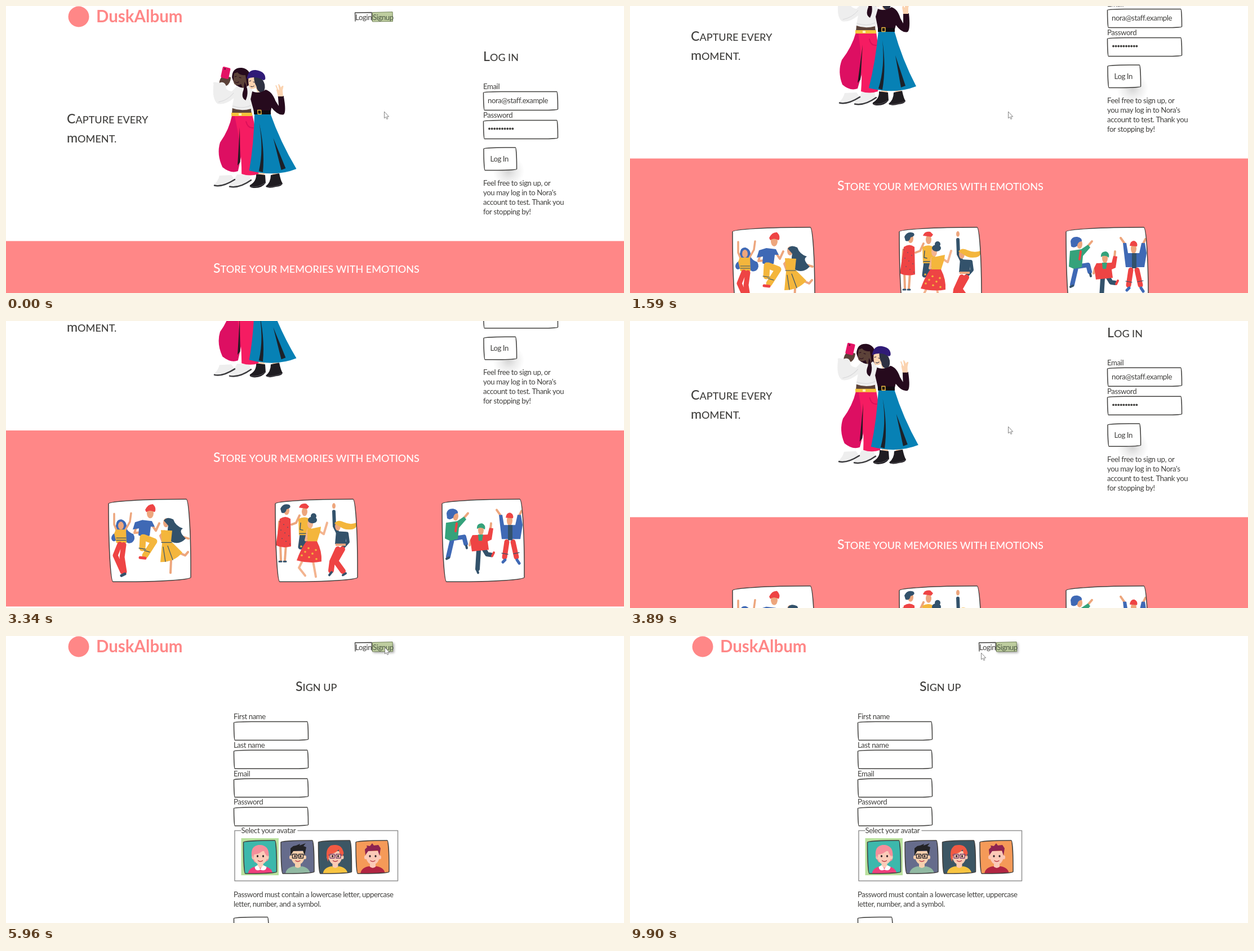
Recreate the animation shown at these times as an HTML page with a canvas. Size 1097 by 511 pixels, loop 9.98 s.

```html
<!DOCTYPE html>
<html lang="en">
<head>
<meta charset="utf-8">
<title>DuskAlbum</title>
<style>
html, body { margin: 0; width: 100%; height: 100%; overflow: hidden; background: #fff; }
canvas { display: block; }
</style>
</head>
<body>
<canvas id="stage" width="1097" height="511"></canvas>
<script>
const ctx = document.getElementById('stage').getContext('2d');
const LOOP = 9980;
const INK = '#41403e', PINK = '#ff8787', NAVY = '#33526b', RED = '#ee4444',
  YELLOW = '#f4b63c', BLUE = '#3f69b5', GREEN = '#35a27b', SKIN = '#eda67d';

// Keys are [time, value, ...], linear between neighbours.
const loginScroll = [[80, 0], [1020, 60], [1100, 60], [1590, 147], [1740, 147], [2060, 269],
  [2540, 330], [2710, 330], [3340, 224], [3660, 110], [3750, 110], [4130, 0]];
const signupScroll = [[6930, 0], [7330, 20.5], [8780, 20.5], [9200, 0]];
const swayKeys = [[0, 1], [400, .85], [1100, .15], [1590, 0], [1740, 0], [2060, .12], [2900, .8],
  [3340, 1], [3660, .8], [4130, .2], [4460, .2], [4940, 0], [5490, .1]];
const cursorKeys = [[4460, 671, 188], [4940, 665, 46], [5420, 672, 20], [6200, 672, 20],
  [6600, 559, 111], [6930, 559, 111], [7200, 545, 128], [7410, 545, 128], [7640, 531, 354],
  [7890, 531, 354], [8370, 488, 338], [8780, 488, 338], [9740, 611, 53], [9820, 615, 45], [9900, 623, 30]];

function at(keys, t) {
  const i = keys.findIndex(k => k[0] > t);
  if (i < 0) return keys[keys.length - 1].slice(1);
  if (i === 0) return keys[0].slice(1);
  const a = keys[i - 1], b = keys[i], u = (t - a[0]) / (b[0] - a[0]);
  return a.slice(1).map((v, j) => v + (b[j + 1] - v) * u);
}

// Text
function setFont(size, weight, tracking = 0) {
  ctx.font = `${weight} ${size}px Lato, sans-serif`;
  ctx.letterSpacing = `${tracking * size}px`;
}
function plain(s, size, x, y) {
  setFont(size, 400, -.03);
  ctx.fillText(s, x, y);
  return ctx.measureText(s).width;
}
function smallCaps(s, size, x, y) {
  let width = 0;
  for (const [part, scale] of [[s[0], 1], [s.slice(1).toUpperCase(), .78]]) {
    setFont(size * scale, 500);
    ctx.fillText(part, x + width, y);
    width += ctx.measureText(part).width;
  }
  return width;
}
const sizeFor = (style, sample, width) => 100 * width / style(sample, 100, 0, -500);
const bodySize = sizeFor(plain, 'Password must contain a lowercase letter, uppercase', 284);
const headSize = sizeFor(smallCaps, 'Store your memories with emotions', 366);

function text(s, x, y, color = INK) {
  ctx.fillStyle = color;
  plain(s, bodySize, x, y);
}
function heading(s, x, y, color = INK) {
  ctx.fillStyle = color;
  smallCaps(s, headSize, x, y);
}

// Shapes
function fill(color, d) {
  ctx.fillStyle = color;
  ctx.fill(new Path2D(d));
}
function line(color, width, d) {
  ctx.strokeStyle = color;
  ctx.lineWidth = width;
  ctx.lineCap = ctx.lineJoin = 'round';
  ctx.stroke(new Path2D(d));
}
function oval(color, x, y, rx, ry = rx) {
  ctx.fillStyle = color;
  ctx.beginPath();
  ctx.ellipse(x, y, rx, ry, 0, 0, 7);
  ctx.fill();
}
function rect(color, x, y, w, h) {
  ctx.fillStyle = color;
  ctx.fillRect(x, y, w, h);
}

// Hand-drawn box with long uneven corners
function paper(x, y, w, h) {
  const f = Math.min(w, h) / 270, a = 255 * f, b = 15 * f, c = 225 * f, q = Math.PI / 2;
  ctx.beginPath();
  ctx.ellipse(x + a, y + b, a, b, 0, 2 * q, 3 * q);
  ctx.ellipse(x + w - b, y + c, b, c, 0, -q, 0);
  ctx.ellipse(x + w - c, y + h - b, c, b, 0, 0, q);
  ctx.ellipse(x + b, y + h - a, b, a, 0, q, 2 * q);
  ctx.closePath();
}
function outline(...area) {
  paper(...area);
  ctx.strokeStyle = INK;
  ctx.lineWidth = 1.5;
  ctx.stroke();
}
function box(...area) {
  paper(...area);
  ctx.fillStyle = '#fff';
  ctx.fill();
  outline(...area);
}
function picture(x, y, w, h, bg, draw) {
  ctx.save();
  paper(x, y, w, h);
  ctx.clip();
  rect(bg, x, y, w, h);
  ctx.translate(x, y);
  draw();
  ctx.restore();
  outline(x, y, w, h);
}
function field(label, x, y, value = '') {
  text(label, x, y);
  box(x + .5, y + 4.5, 132, 33);
  text(value, x + 8, y + 25);
}
function button(label, x, y, w) {
  const cx = x + w - 14, cy = y + 42;
  const glow = ctx.createRadialGradient(cx, cy, 0, cx, cy, 28);
  glow.addColorStop(0, 'rgba(0,0,0,.17)');
  glow.addColorStop(.5, 'rgba(0,0,0,.07)');
  glow.addColorStop(1, 'rgba(0,0,0,0)');
  oval(glow, cx, cy, 28);
  box(x + .5, y + .5, w, 40.5);
  text(label, x + 12, y + 25.5);
}

function header(hover) {
  oval(PINK, 129, 19, 18.5);
  setFont(29.5, 700);
  ctx.fillStyle = PINK;
  ctx.fillText('DuskAlbum', 160, 28.5);
  line(INK, 1.3, 'M620 27L619.5 12L649 11.5L650 26');
  text('Login', 620, 25);
  ctx.save();
  if (hover) {
    ctx.shadowColor = 'rgba(0,0,0,.35)';
    ctx.shadowBlur = 4;
    ctx.shadowOffsetX = ctx.shadowOffsetY = 2;
  }
  rect('#becd9f', 650, 11, 36.5, 16.5);
  ctx.restore();
  line('#75865b', 1, 'M650.5 27.5L650.5 11.5L686 10.5L686.5 27Z');
  text('Signup', 651, 25, '#4d5a45');
}

// Two friends swaying: hips and hems lean opposite to the shoulders.
function lean(k, draw) {
  ctx.save();
  ctx.transform(1, 0, k, 1, -k * 190, 0);
  draw();
  ctx.restore();
}
function friends(s) {
  const dark = '#260a1d', brown = '#5c4239', white = '#eeeeee', pale = '#fbd3b0', shoe = '#1f1c21';
  ctx.save();
  ctx.translate(-2 * s, 0);
  fill(white, 'M381 302Q378 313 371 318Q374 322 386 321Q397 318 408 309L402 301Z');
  fill(white, 'M412 300Q407 311 398 318Q402 323 414 322Q427 317 436 309L434 300Z');
  line('#3a3a3d', 2.5, 'M372 319.5Q386 323 408 309M399 321.5Q416 325 437 310');
  ctx.restore();
  ctx.save();
  ctx.translate(2 * s, 0);
  fill(pale, 'M446 290H457V304H446ZM471 290H481V304H471Z');
  fill(shoe, 'M442 299L458 301L459 315Q452 325 437 324Q429 323 431 319Q443 312 442 299Z');
  fill(shoe, 'M468 301L483 298Q486 312 489 316Q488 321 477 322Q463 326 459 321Q468 314 468 301Z');
  line('#555258', 1, 'M432 321.5Q446 324 458 315M461 322.5Q477 322 488 317');
  ctx.restore();

  lean(.075 * s, () => {
    fill('#dd0f62', 'M401 194L425 196Q418 250 404 294Q391 299 377 287Q368 264 376 243Q394 220 401 194Z');
    fill('#f51c62', 'M405 194L437 194L445 248L440 299Q425 304 410 299Q414 250 405 194Z');
    fill('#221a21', 'M413 216Q408 255 404 284L409 278Z');
    line('#dc1059', 2, 'M425 206Q427 218 437 217');
  });
  lean(.03 * s, () => {
    fill(dark, 'M403 127Q404 109 421 110Q437 112 437 133Q440 151 428 168Q418 165 422 146Q407 145 403 127Z');
    fill(brown, 'M407 120Q404 134 407 139Q412 143 419 139L422 148L430 146L427 123Q417 124 413 118Z');
    line(dark, 1, 'M408 126L411 125M416 127L419 128M408 135Q411 138 415 135');
    fill(brown, 'M380 139Q380 129 388 124L401 127Q400 138 393 142Z');
    ctx.save();
    ctx.translate(392, 119);
    ctx.rotate(.24);
    ctx.fillStyle = '#e41365';
    ctx.beginPath();
    ctx.roundRect(-7, -10, 14, 20, 2);
    ctx.fill();
    ctx.restore();
    oval('#5c1334', 391, 112, 1.5);
    fill(white, 'M370 139Q367 133 380 137Q389 133 392 142Q390 150 402 152L412 142Q423 150 432 141L440 152L437 185Q417 190 401 184L405 164Q389 177 376 174Q366 166 370 139Z');
    line('#d7d7d9', 1, 'M378 171Q394 168 405 155M403 178Q420 184 435 177');
    fill(dark, 'M425 135Q434 152 426 168Q417 163 423 149Z');
    fill(brown, 'M402 182Q418 188 435 183L436 192H401Z');
    rect('#f4c23a', 400, 190, 37, 6);
    rect('#fff1bd', 413, 191, 5, 4);
  });

  lean(.075 * s, () => {
    fill('#0781b5', 'M441 191H469Q483 242 508 290Q470 305 424 293Q436 245 441 191Z');
    fill('#1c2129', 'M448 208Q453 255 441 294L448 296Q455 255 448 208ZM471 235L489 289L481 292Z');
    fill(pale, 'M435 127Q433 142 437 147Q442 149 447 145L449 154L457 150L452 127Z');
    fill('#2e3142', 'M445 124Q460 124 463 140Q464 152 456 154Q448 152 448 143Q444 136 445 124Z');
    line('#333146', 1, 'M436 134L439 133M443 135L445 136M438 143Q441 145 444 142');
    fill('#301b77', 'M432 130Q435 113 449 114Q465 116 465 128Q465 132 461 132Q447 123 432 130Z');
    fill(dark, 'M440 152Q452 157 464 149Q475 152 480 169L485 178L485 160H495Q498 188 493 193Q483 196 472 181L469 192H441L436 166Z');
    fill(pale, 'M485 161L483 149Q485 147 488 150L488 142Q490 139 491 145L494 142Q496 143 494 148L494 161Z');
    line(pale, 2, 'M486 151L483 142M489 149L488 140M493 150L495 143');
    rect('#100b11', 440, 186, 30, 7);
    ctx.strokeStyle = '#f0bc42';
    ctx.lineWidth = 1.4;
    ctx.strokeRect(447, 185.5, 6, 7);
  });
}

// Dancers, in card coordinates
function dancersA() {
  fill(BLUE, 'M13 47Q14 35 23 36Q33 39 32 52Q35 59 44 62Q49 71 42 77Q34 81 30 74L14 73Q7 78 5 70Q5 63 12 60Z');
  line(SKIN, 3.5, 'M15 57L10 45L10 26M29 56L38 40L40 25');
  oval(SKIN, 22, 47, 5, 7);
  fill(YELLOW, 'M13 54L31 54L32 78H14L10 61Z');
  line(NAVY, 1.2, 'M14 69H31M14 73H31');
  line(RED, 9, 'M20 80L12 100L25 129M27 81L24 103L28 129');
  line(NAVY, 5, 'M23 136L29 133');
  line(SKIN, 4, 'M50 47L46 60L58 59M78 47L84 56L90 43');
  fill(BLUE, 'M47 41L60 37L77 39L82 49L75 49L73 65Q62 70 53 64L54 52L43 54Z');
  oval(SKIN, 74, 25, 6, 9);
  fill(RED, 'M65 19Q70 8 79 9Q86 16 82 23Q73 18 67 23Z');
  line(YELLOW, 11, 'M63 68L81 75L65 100M61 68L60 87');
  line(NAVY, 1.2, 'M54 87L66 89M63 91L73 94');
  line(RED, 5, 'M56 104L65 105');
  line(SKIN, 4, 'M99 57L92 65L96 76M113 59L125 65L142 70M111 108L110 131M118 92L136 100L141 94');
  oval(SKIN, 102, 42, 5, 8);
  fill(NAVY, 'M98 38Q104 30 115 36Q119 48 132 52Q123 57 137 70Q126 82 112 76Q102 66 106 47Z');
  fill(YELLOW, 'M93 55L113 56L111 75L131 95Q117 112 92 112L95 79Z');
  line(NAVY, 1.2, 'M94 77H112M97 85L101 111M105 83L114 108');
}
function dancersB() {
  line(SKIN, 4, 'M7 40L6 59L12 61M29 45L37 42L43 29M9 80L10 109M19 80L17 109');
  line(NAVY, 3, 'M7 111H11M15 111H19');
  fill(RED, 'M8 35Q18 28 27 35L28 84Q13 88 1 82Z');
  oval(SKIN, 20, 20, 5, 8);
  fill(NAVY, 'M9 17Q14 6 25 10Q30 15 20 18Q18 27 11 24Z');
  for (let i = 0; i < 9; i++) oval(NAVY, 8 + i * 7 % 19, 40 + i * 5, .8);
  line(NAVY, 9, 'M48 62L45 85M57 62L53 85');
  oval(SKIN, 52, 22, 5, 8);
  fill(YELLOW, 'M41 35Q53 29 62 36L65 64H42Z');
  line(NAVY, 1.4, 'M43 61H63M45 42L44 54L49 55');
  fill(RED, 'M42 15Q45 6 55 8L60 13L57 17Z');
  line('#f3b490', 4, 'M58 55L54 73L65 70M78 57L86 62L92 42M48 110L42 122L53 136M67 110L72 138');
  oval('#f3b490', 62, 44, 5, 8);
  oval(NAVY, 66, 37, 8, 6);
  oval(NAVY, 68, 30, 5);
  fill(YELLOW, 'M57 54L81 49L80 57L74 76H57Z');
  fill(RED, 'M55 75H74Q83 92 82 111Q61 115 38 109Q45 89 55 75Z');
  for (let i = 0; i < 8; i++) oval(YELLOW, 46 + i * 13 % 32, 84 + i * 3.2, 1.8);
  line(NAVY, 6, 'M111 60L105 48L104 22M127 61L129 76L119 87');
  oval(SKIN, 104, 12, 3, 5);
  oval(SKIN, 111, 48, 5, 8);
  fill(YELLOW, 'M105 43Q111 35 122 41Q133 46 144 42Q147 54 130 54Q121 54 115 49Z');
  fill(NAVY, 'M108 57L126 58L125 80H106Z');
  rect(SKIN, 107, 79, 18, 4);
  line(RED, 10, 'M111 89L101 111L99 127M119 89L107 110L120 128');
  line(NAVY, 4, 'M96 135L100 130M120 135L125 132');
}
function dancersC() {
  line(BLUE, 8, 'M18 72L11 102M20 70L39 67L42 79');
  line(NAVY, 4, 'M8 106L12 104M43 83L44 87');
  line(SKIN, 4, 'M40 32L46 25');
  oval(SKIN, 24, 30, 5, 8);
  fill(BLUE, 'M8 25Q10 16 20 17Q29 19 28 25Q21 25 20 33Q14 38 9 34Z');
  fill(GREEN, 'M7 42L27 39L39 31L43 36L30 51L28 71L14 74L5 70Z');
  line(RED, 4, 'M26 43L24 57');
  line(NAVY, 8, 'M65 91L63 124M74 88L80 98L87 99');
  line(RED, 4, 'M89 101L92 95');
  line(SKIN, 4, 'M86 54L87 43M51 74L49 82');
  oval(SKIN, 69, 55, 5, 9);
  fill(GREEN, 'M62 53Q61 43 71 43Q78 46 76 54Q69 48 62 53Z');
  fill(RED, 'M54 64L81 63L84 51L91 52L88 72L81 75L83 90L53 93L50 72Z');
  fill(GREEN, 'M64 63H73L71 74H65Z');
  line(NAVY, 4, 'M62 126L64 131');
  line(RED, 9, 'M115 76L111 103M126 76L132 103');
  line(NAVY, 1.2, 'M106 96L117 98M127 97L137 95');
  line(BLUE, 5, 'M108 112L112 108M133 108L137 114');
  line(SKIN, 4, 'M104 29L97 19M137 29L141 21');
  oval(SKIN, 120, 38, 5, 9);
  fill(RED, 'M113 33Q114 24 121 24Q128 27 126 34Z');
  fill(BLUE, 'M101 28H107L110 46H130L134 28H140L143 46L139 71H106L104 55Z');
  rect(NAVY, 117, 46, 8, 27);
}

function login(scroll, t) {
  ctx.translate(0, -scroll);
  header(t > 5300);
  heading('Log in', 847, 98);
  field('Email', 847, 148, 'nora@staff.example');
  field('Password', 847, 199);
  for (let i = 0; i < 10; i++) oval(INK, 858 + i * 4.6, 218.5, 1.9);
  button('Log In', 847.5, 251.5, 58.5);
  ['Feel free to sign up, or', "you may log in to Nora's", 'account to test. Thank you', 'for stopping by!']
    .forEach((s, i) => text(s, 847, 320 + i * 17));
  heading('Capture every', 108, 209);
  heading('moment.', 108, 243);
  friends(at(swayKeys, t)[0]);
  rect(PINK, 0, 418.5, 1097, 313.5);
  heading('Store your memories with emotions', 368, 475, '#fff');
  [dancersA, dancersB, dancersC].forEach((d, i) => picture(182 + 296 * i, 541, 146, 147, '#fff', d));
  text('Treasure your feelings. This is a collection of the little affairs, moments and days that make you who you are.', 235, 790);
}

function avatar(i, bg, hair, cut, shirt, skin, glasses, collar) {
  picture(421.5 + 66.5 * i, 364, 59, 59, bg, () => {
    if (i === 0) fill(hair, 'M15 31Q11 8 30 8Q49 10 44 35L38 39H20Z');
    rect(skin, 25, 36, 10, 14);
    fill(shirt, 'M8 60Q9 48 24 46Q30 52 36 46Q51 48 52 60Z');
    if (collar) fill('#fff', 'M20 47L25 44L30 51L35 44L41 47Q40 56 30 52Q21 56 20 47Z');
    oval(skin, 17.5, 30, 2.5, 3.5);
    oval(skin, 42.5, 30, 2.5, 3.5);
    fill(skin, 'M18 19H42V31Q39 43 30 43Q21 43 18 31Z');
    fill(hair, cut);
    oval('#33272b', 25, 28, 1.6, 2);
    oval('#33272b', 35, 28, 1.6, 2);
    line('#b93a46', 1.3, 'M26 36Q30 39 34 36');
    if (glasses) {
      ctx.strokeStyle = glasses;
      ctx.lineWidth = 1.3;
      ctx.strokeRect(20.5, 24.5, 8, 7);
      ctx.strokeRect(31.5, 24.5, 8, 7);
      line(glasses, 1.2, 'M29 27H31M18 26H20M40 26H42');
    }
  });
}

function signup(scroll) {
  ctx.translate(0, -scroll);
  header(true);
  heading('Sign up', 514, 98);
  ['First name', 'Last name', 'Email', 'Password'].forEach((s, i) => field(s, 404, 148 + i * 50.8));
  line('#929292', 1.5, 'M417 346.5H406V436H695.5V346.5H518');
  text('Select your avatar', 417.5, 351);
  rect('#b9e19d', 417.5, 360, 66.5, 66);
  avatar(0, '#3cb8ac', '#f58f9b', 'M17 33Q12 13 27 8Q46 8 43 29Q38 25 36 17Q29 24 19 25Z', '#ef407c', '#fbcbb8', '', true);
  avatar(1, '#666c8c', '#232326', 'M17 27L17 14L22 10L27 9L34 6L33 9L44 5L40 10L45 12L42 27L39 18L22 19Z', '#91b9a2', '#f7cfad', '#26262b');
  avatar(2, '#3c5664', '#f15a43', 'M17 38Q10 17 22 9Q42 4 45 23L42 29Q37 24 36 16Q30 24 20 24Z', '#f8c441', '#fbcbb3', '#70406f');
  avatar(3, '#f59a58', '#8e2350', 'M17 26L16 16L20 12L19 9L25 10L29 5L32 9L40 8L44 14L42 27L39 18L22 19Z', '#b12542', '#fbc9b8');
  text('Password must contain a lowercase letter, uppercase', 404, 464.5);
  text('letter, number, and a symbol.', 404, 481.5);
  button('Sign up', 404, 500, 62);
}

function cursor(x, y) {
  ctx.translate(x, y);
  const arrow = 'M.5 .5V12L3 9.5L5 13.5L6.8 12.6L5 9H8.3Z';
  fill('#fff', arrow);
  line('#666', .8, arrow);
}

function layer(draw, ...args) {
  ctx.save();
  draw(...args);
  ctx.restore();
}
function frame(now) {
  const t = now % LOOP;
  rect('#fff', 0, 0, 1097, 511);
  if (t < 5490) layer(login, at(loginScroll, t)[0], t);
  else layer(signup, at(signupScroll, t)[0]);
  if (t < 2710 || t >= 3750) layer(cursor, ...at(cursorKeys, t));
  requestAnimationFrame(frame);
}
requestAnimationFrame(frame);
</script>
</body>
</html>
```
